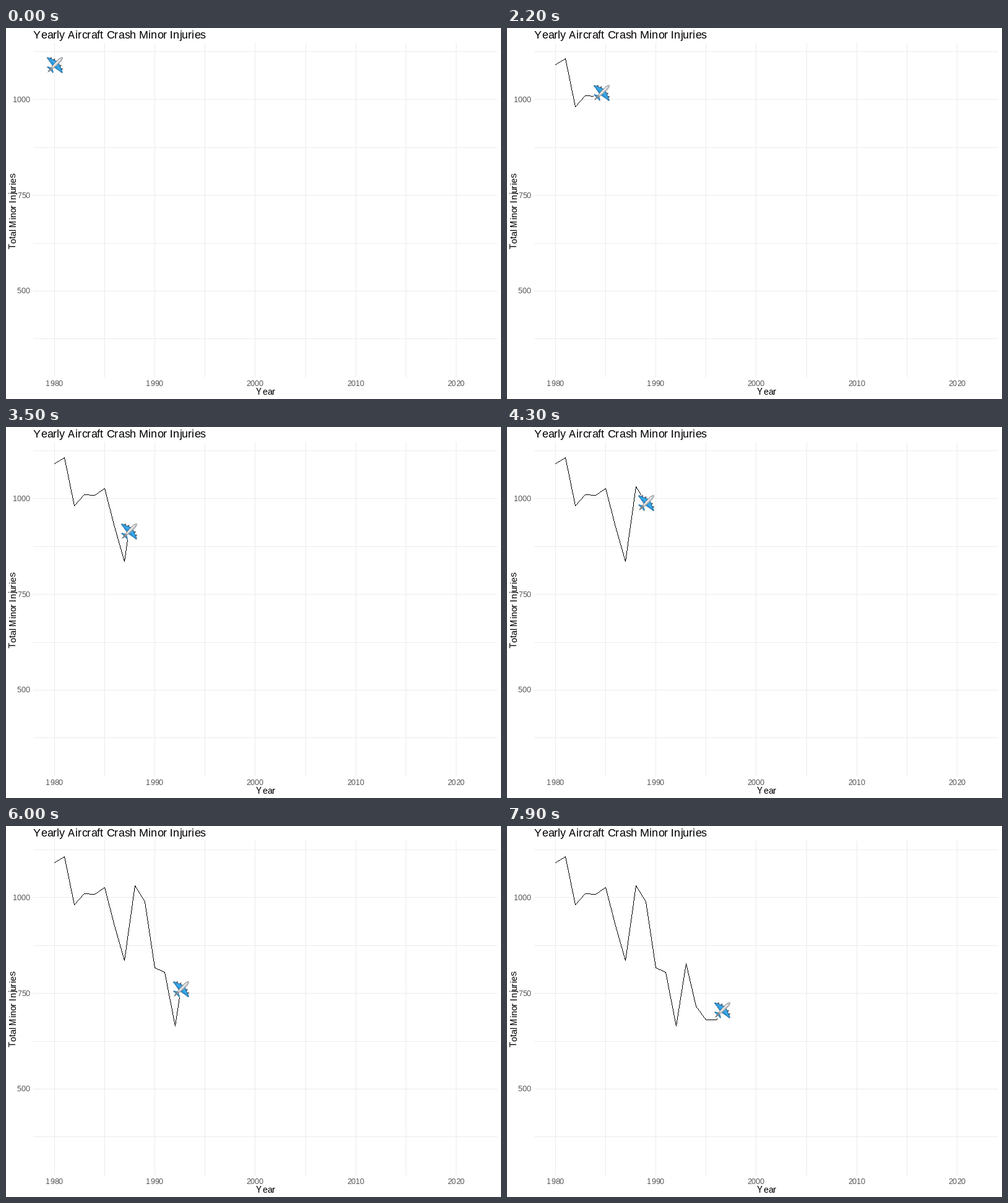
Write a matplotlib script that moves like this. It is 800x600 px and loops after 8000 ms.

```python
import numpy as np
import matplotlib.pyplot as plt
from matplotlib.animation import FuncAnimation
from matplotlib.patches import Ellipse, Polygon, Rectangle
from matplotlib.textpath import TextPath
from matplotlib.transforms import Affine2D

plt.rcParams.update({
    "font.family": "Liberation Sans",
    "text.hinting": "native",
    "text.hinting_factor": 1,
})

W, H, DPI = 800, 600, 96
PX = 72 / DPI                      # points per pixel
FRAMES, FULL_FRAMES = 80, 200
FIRST, LAST = 1980, 2022
LEFT, RIGHT, TOP, BOTTOM = 44, 794, 24, 565

INJURIES = np.array([1091, 1107, 981, 1010, 1008, 1026, 927, 836, 1032,
                     990, 816, 805, 664, 827, 716, 681, 681, 725])


def year_x(year):
    return 78.2 + 16.24 * (year - FIRST)


def value_y(value):
    return 115.85 + 0.6192 * (1000 - value)


steps = np.arange(len(INJURIES))
xs, ys = year_x(FIRST + steps), value_y(INJURIES)
# every year is reached on a whole frame
arrivals = np.round(steps * (FULL_FRAMES - 1) / (LAST - FIRST))

fig = plt.figure(figsize=(W / DPI, H / DPI), dpi=DPI, facecolor="white")
ax = fig.add_axes([0, 0, 1, 1])
ax.set(xlim=(0, W), ylim=(H, 0))
ax.axis("off")


def advance(char, size):
    """Glyph advance in whole pixels, as a screen font uses it."""
    def span(text):
        return TextPath((0, 0), text, size=100).get_extents().width
    em = (span(f"|{char}|") - span("||")) / 100
    return int(em * size + 0.501)


def label(x, y, text, size, color="black", anchor=0.0, rotation=0):
    """Lay out unkerned text on the pixel grid; anchor 0 left, 0.5 centre, 1 right."""
    widths = [advance(char, size) for char in text]
    pen = -int(anchor * sum(widths))
    for char, width in zip(text, widths):
        px, py = (x, y - pen) if rotation else (x + pen, y)
        if char != " ":
            ax.text(px, py, char, fontsize=size * PX, color=color, ha="left",
                    va="baseline", rotation=rotation, rotation_mode="anchor")
        pen += width


def draw_chart():
    style = dict(colors="#EBEBEB", linewidth=PX, capstyle="butt",
                 snap=False, zorder=1)
    cols = np.floor(year_x(np.arange(1980, 2021, 5))) + 0.5
    rows = np.floor(value_y(np.arange(375, 1126, 125))) + 0.5
    ax.vlines(cols, TOP, BOTTOM, **style)
    ax.hlines(rows, LEFT, RIGHT, **style)
    for year in range(1980, 2021, 10):
        label(int(year_x(year)), 579, str(year), 12, "#4D4D4D", 0.5)
    for value in (500, 750, 1000):
        label(39, round(value_y(value)) + 4, str(value), 12, "#4D4D4D", 1)
    label(LEFT, 17, "Yearly Aircraft Crash Minor Injuries", 18)
    label(419, 593, "Year", 15, anchor=0.5)
    label(16, 296, "Total Minor Injuries", 15, anchor=0.5, rotation=90)


def mirror(points):
    """Reflect across the plane's nose-to-tail axis."""
    return [(-y, -x) for x, y in points]


def fuselage(lo, hi):
    """Band of the body between two fractions of its half-width."""
    s = np.linspace(0, 1, 30)
    half = 2.4 * np.sqrt(np.minimum(1, (1 - s) * 6)) * np.minimum(1, 0.2 + 1.7 * s)
    cx, cy = -10.5 + 22.8 * s, 10.5 - 22.8 * s
    near = np.c_[cx + lo * half * 0.71, cy + lo * half * 0.71]
    far = np.c_[cx + hi * half * 0.71, cy + hi * half * 0.71]
    return np.r_[near, far[::-1]]


shift = Affine2D()


def add(patch):
    patch.set_transform(shift + ax.transData)
    ax.add_patch(patch)


def shape(points, fill, edge="none", width=0.0):
    add(Polygon(points, facecolor=fill, edgecolor=edge, linewidth=width * PX,
                joinstyle="round", zorder=4))


def draw_plane():
    wing = [(-12.8, -11.6), (-11.4, -12.4), (-6, -10), (3, -6.4),
            (4, -3), (-2, 2), (-3.8, 0.8), (-6.4, -3), (-9.4, -7.4)]
    sheen = [(-10.5, -11), (-5.5, -8.6), (2, -5.2), (-1, -2.2), (-5, -5)]
    tail = [(-12.7, 3.2), (-11, 2.6), (-6, 4.2), (-4.6, 6), (-8, 8.2), (-9.4, 5.8)]
    add(Rectangle((-13, -13), 26, 26, facecolor="white", linewidth=0, zorder=3))
    for flip in (list, mirror):
        for engine in ((-6.4, -11.1), (-1.2, -9)):
            add(Ellipse(flip([engine])[0], 3, 1.9, angle=-45, facecolor="#6E7780",
                        edgecolor="#30363C", linewidth=0.5 * PX, zorder=4))
        shape(flip(wing), "#2797DC", "#1F4E75", 0.6)
        shape(flip(sheen), "#3BA8EA")
        shape(flip(tail), "#2797DC", "#1F4E75", 0.5)
    shape(fuselage(-1, 1), "#E6E6E6", "#66696C", 0.7)
    shape(fuselage(0.3, 0.95), "#B4B6B9")
    shape([(-11.6, 11.6), (-4.6, 4.2), (-4.1, 4.7)], "#9A9DA0", "#66696C", 0.5)
    shape([(9.2, -10.8), (10.4, -10.6), (10.2, -9.6)], "#50565C")


def trail_layer(px, py):
    """Black one-pixel polyline without smoothing on a clear layer."""
    layer = np.zeros((H, W, 4), np.uint8)
    for x0, y0, x1, y1 in zip(px, py, px[1:], py[1:]):
        count = max(abs(x1 - x0), abs(y1 - y0)) + 1
        cols = np.round(np.linspace(x0, x1, count)).astype(int)
        rows = np.round(np.linspace(y0, y1, count)).astype(int)
        layer[rows, cols, 3] = 255
    return layer


draw_chart()
trail = ax.imshow(np.zeros((H, W, 4), np.uint8), extent=(0, W, H, 0),
                  aspect="auto", interpolation="nearest", zorder=2)
draw_plane()


def update(frame):
    x, y = np.interp(frame, arrivals, xs), np.interp(frame, arrivals, ys)
    past = arrivals < frame
    trail.set_data(trail_layer(np.append(xs[past], x).astype(int),
                               np.append(ys[past], y).astype(int)))
    shift.clear().translate(np.floor(x) + 1, np.floor(y) + 1)
    return [trail]


anim = FuncAnimation(fig, update, frames=FRAMES, init_func=lambda: [trail],
                     interval=100, repeat=True, repeat_delay=0)
plt.show()
```
